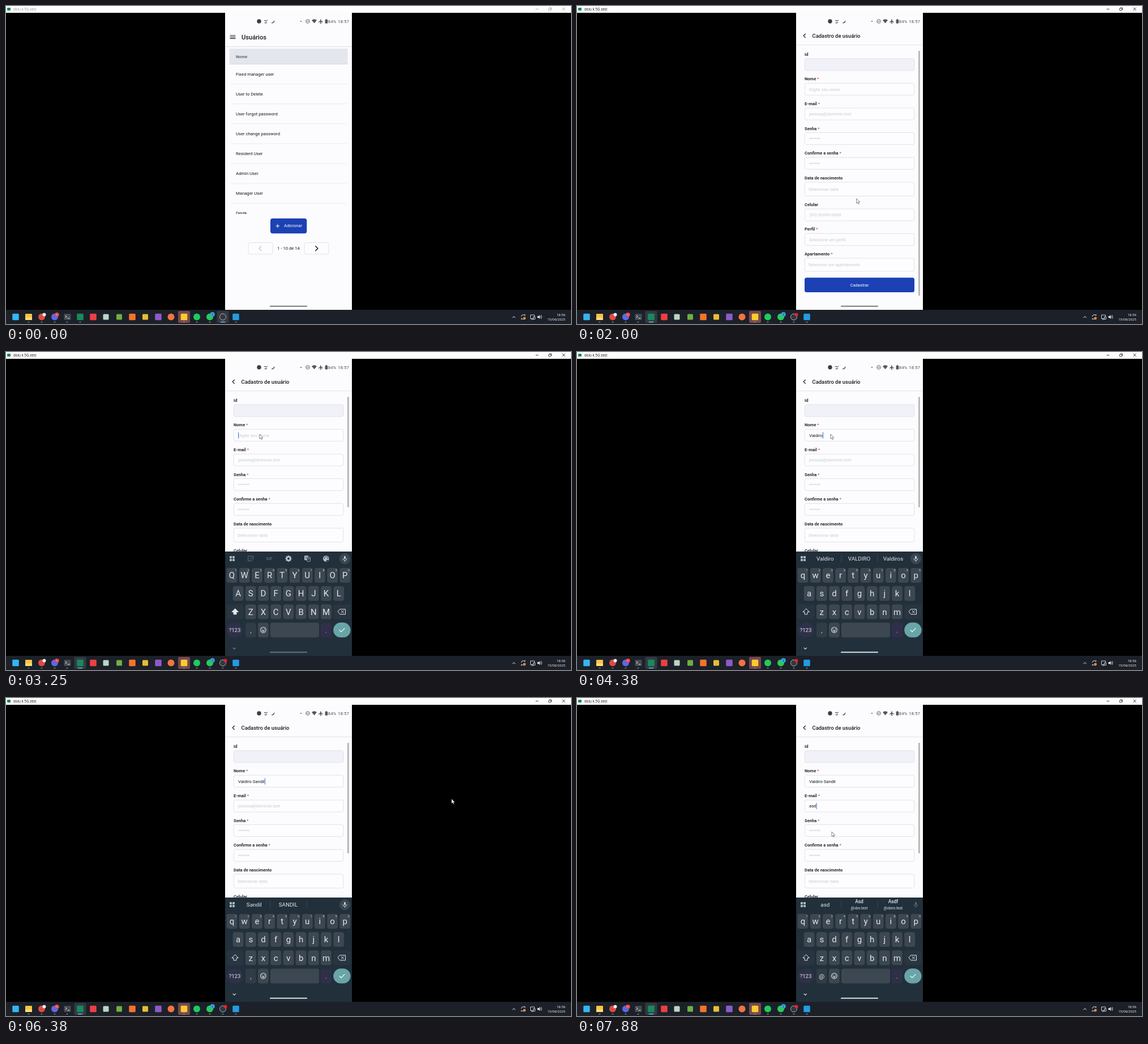
Write an HTML page that moves like this. It is 998x561 px and loops after 8 s.

```html
<!DOCTYPE html>
<html lang="pt-BR">
<head>
<meta charset="utf-8">
<title>Cadastro de usuário</title>
<style>
  html, body { margin: 0; width: 100%; height: 100%; overflow: hidden; background: #000; }
  svg { display: block; width: 100vw; height: 100vh; }
  text { font-family: Roboto, sans-serif; white-space: pre; }
  .desk text { font-family: "Open Sans", "Noto Sans", sans-serif; }
  .line { fill: none; stroke-linecap: round; stroke-linejoin: round; }
</style>
</head>
<body>
<svg id="stage" viewBox="0 0 998 561" xmlns="http://www.w3.org/2000/svg"></svg>
<script>
const LOOP = 8000, STEP = 125;
const FIRST = 'Valdiro', LAST = 'Sandil';
const INK = '#17181c', PALE = '#e3e8ec';

// Markup helpers; text is placed by the middle of its line.
const attrs = o => Object.entries(o).map(([k, v]) => ` ${k}="${v}"`).join('');
const rect = (x, y, w, h, fill, o = {}) =>
  `<rect x="${x}" y="${y}" width="${w}" height="${h}" fill="${fill}"${attrs(o)}/>`;
const circle = (x, y, r, fill, o = {}) => `<circle cx="${x}" cy="${y}" r="${r}" fill="${fill}"${attrs(o)}/>`;
const text = (x, y, size, fill, str, o = {}) =>
  `<text x="${x}" y="${y + size * 0.35}" font-size="${size}" fill="${fill}"${attrs(o)}>${str}</text>`;
const mid = (x, y, size, fill, str, o = {}) => text(x, y, size, fill, str, { 'text-anchor': 'middle', ...o });
const line = (d, stroke, width = 1, o = {}) =>
  `<path class="line" d="${d}" stroke="${stroke}" stroke-width="${width}"${attrs(o)}/>`;
const shape = (d, fill) => `<path d="${d}" fill="${fill}"/>`;
const group = (id, body, o = {}) => `<g id="${id}"${attrs(o)}>${body}</g>`;

function titleBar() {
  return rect(0, 0, 998, 12, '#fdfdfd') + rect(2, 3, 6, 5, '#178a5c', { rx: 1 }) +
    group('title', text(13, 6, 6.2, 'currentColor', 'dolu k 5G zest') +
      line('M936 5.5h4', 'currentColor', .8) +
      rect(958.5, 4, 3.8, 3.8, 'none', { stroke: 'currentColor', 'stroke-width': .8, rx: .8 }) +
      line('M960 3h3.5v3.5', 'currentColor', .7) +
      line('M982.8 3l4.6 4.6M987.4 3l-4.6 4.6', 'currentColor', .8));
}

function taskbar() {
  const square = (x, c, s = 11.5) => rect(x - s / 2, 548.5 - s / 2, s, s, c, { rx: 1.5 });
  const disc = (x, c) => circle(x, 548.5, 6, c);
  const marks = square(17, '#35b5f1') +
    rect(34, 543, 12, 11, '#f6c445', { rx: 1 }) + rect(34, 549.5, 12, 4.5, '#ffdc78', { rx: 1 }) +
    disc(63, '#dc4b3e') + circle(67.5, 544.5, 3, '#eee') +
    disc(86, '#5968ea') + circle(90, 544.5, 3.8, '#e5424a') +
    mid(90, 544.4, 4.2, '#fff', '9+') +
    rect(102.5, 543, 12, 11, '#454a50', { rx: 1 }) +
    line('M105 546l2.2 2-2.2 2M109 551h3', '#eee', 1) +
    square(131, '#178a5c') + square(154, '#ec3f42') + square(176.5, '#b9d6c4', 10) +
    square(200, '#6fae43', 10) + square(223, '#f4732b') + square(246, '#e9bd35', 10) +
    square(269, '#8b5bc8') + disc(291.5, '#f47340') +
    rect(304, 538, 21, 21, '#794750', { rx: 2 }) + square(314.5, '#f8cc2d') +
    disc(337, '#1fcb5d') + disc(360, '#29c95c') + circle(364.7, 544, 4, '#35a9e5') +
    mid(364.7, 543.8, 5.5, '#12202a', '2') +
    disc(383, '#33363c') + circle(383, 548.5, 5.5, 'none', { stroke: '#c9cbd0', 'stroke-width': .8 }) +
    group('recDot', circle(387.5, 544.5, 3, '#e8202c')) + square(406, '#249be2');
  const dots = [40, 63, 86, 108, 131, 314.5, 337, 360, 383, 406]
    .map(x => rect(x - 1.7, 557, 3.4, 1.2, '#8d9299', { rx: .6 })).join('');
  const tray = line('M894.7 550l2.4-2.4 2.4 2.4', '#eee', 1) +
    line('M910.2 547.5a3.6 3.6 0 0 1 6.5-1.3v-2M916.5 550a3.6 3.6 0 0 1-6.2 1v1.8', '#e4e6e8', 1) +
    circle(915.7, 551, 2.4, '#f08a3a') +
    line('M931 551.5h-4.5v-6.5h7v3M928 553h3', '#e4e6e8', .9) +
    rect(931.5, 548.5, 3, 4, 'none', { stroke: '#e4e6e8', 'stroke-width': .8 }) +
    shape('M938.5 547.2h2l2.2-2v6.8l-2.2-2h-2z', '#e4e6e8') +
    line('M944 546.8q1.1 1.7 0 3.4M945.5 545.5q2 3 0 6', '#e4e6e8', .8) +
    text(988, 544.6, 6, '#fff', '18:56', { 'text-anchor': 'end' }) +
    text(988, 552.4, 6, '#fff', '15/06/2025', { 'text-anchor': 'end' });
  return rect(0, 536, 998, 25, '#1c2028') +
    group('activeTab', rect(-10.5, 538, 21, 21, '#343941', { rx: 2 })) + marks + dots +
    group('activeBar', rect(-4.5, 556.8, 9, 1.5, '#63bdea', { rx: .7 })) + tray;
}

function statusBar() {
  const c = '#55565a';
  return circle(447, 27, 3.7, '#3c3d40') + line('M456.5 26q1-1.5 2 0t3-1M457 29.5q2 1 3.5-.5', '#47484c', 1.2) +
    shape('M474 25a4 4 0 0 1-6 4.7q4 0 6-4.7z', '#47484c') + circle(521, 27, 1, c) +
    circle(533, 27, 3.3, 'none', { stroke: c, 'stroke-width': .9 }) + line('M531.4 27h3.2', c, .9) +
    shape('M540 25q4.5-3.5 9 0l-4.5 5.6z', c) +
    shape('M555.3 23.5h1.2l.3 2.4 3 2v1l-3-.8-.2 1.6 1 .8v.6l-1.7-.4-1.7.4v-.6l1-.8-.2-1.6-3 .8v-1l3-2z', c) +
    rect(563.6, 24, 4.6, 6.8, c, { rx: .8 }) + rect(564.9, 23.2, 2, 1, c) +
    text(568.8, 27.3, 7.8, c, '84%') + text(586, 27.3, 8, c, '18:57');
}

function listScreen() {
  const names = ['Fixed manager user', 'User to Delete', 'User forgot password', 'User change password',
    'Resident User', 'Admin User', 'Manager User', 'Derek'];
  const rows = names.map((name, i) => {
    const y = 120 + 35.1 * i;
    return text(406, y, 7.69, INK, name) + line(`M397 ${y + 17.6}H601`, '#e2e2e6', .7);
  }).join('');
  const pager = (x, d, stroke) => rect(x, 417.5, 43, 20.3, '#fdfdff', { rx: 3, stroke: '#dcdce3', 'stroke-width': .8 }) +
    line(d, stroke, 1.5);
  return rect(387, 36, 224, 500, '#fcfcfe') +
    line('M396 52h9M396 54.7h9M396 57.4h9', INK, 1.1) +
    text(416, 55, 11.1, INK, 'Usuários', { 'font-weight': 500 }) +
    rect(387, 71.2, 224, 1, '#dcdce2') +
    rect(394.5, 75.3, 209, 27.3, '#e3e6ec') + rect(394.5, 102, 209, .8, '#cdd1dc') +
    text(406, 89.3, 7.6, '#666a70', 'Nome', { 'font-weight': 700 }) +
    group('rows', rows, { 'clip-path': 'url(#rowsClip)' }) +
    rect(467, 374.7, 64.3, 26.6, '#1b41b4', { rx: 4 }) +
    line('M476.8 388h6M479.8 385v6', '#fff', 1) + text(491, 387.8, 7.6, '#fff', 'Adicionar') +
    pager(428, 'M451 423.8l-4 4 4 4', '#c6c6cc') + pager(527, 'M546.8 423.8l4 4-4 4', INK) +
    mid(499, 427.8, 7.66, INK, '1 - 10 de 14');
}

function formScreen() {
  const fields = [ // label, required, label y, box top, box height, placeholder, placeholder x
    ['Id', 0, 85, 92.8, 21, '', 410], ['Nome', 1, 128.8, 136.3, 21, 'Digite seu nome', 410],
    ['E-mail', 1, 172.4, 180, 21, 'pessoa@dominio.test', 410], ['Senha', 1, 216, 223.4, 21, '******', 410],
    ['Confirme a senha', 1, 259.6, 267.2, 21, '******', 410],
    ['Data de nascimento', 0, 303, 310.8, 24.4, 'Selecionar data', 409],
    ['Celular', 0, 350.3, 358, 21, '(00) 00000-0000', 410],
    ['Perfil', 1, 393.8, 401.4, 21, 'Selecione um perfil', 410],
    ['Apartamento', 1, 437.3, 445, 23, 'Selecione um apartamento', 408.5]
  ].map(([label, need, y, top, h, hint, x], i) =>
    text(402, y, 7.55, '#292a30', label + (need ? ' <tspan fill="#df5a50">*</tspan>' : ''), { 'font-weight': 700 }) +
    rect(402.4, top, 193.4, h, i ? '#fdfdff' : '#f1f1fa', { rx: 3, stroke: '#dcdce1', 'stroke-width': .8 }) +
    text(x, top + h / 2 + .2, 7.66, '#cbcbcf', hint, { id: 'hint' + i })).join('');
  return rect(387, 36, 224, 500, '#fcfcfe') + line('M403.3 49.2l-3.2 3.2 3.2 3.2', INK, 1.3) +
    text(415.5, 52.6, 9.45, INK, 'Cadastro de usuário', { 'font-weight': 500 }) +
    rect(387, 68.2, 224, 1, '#e3e3ea') + fields +
    text(410, 147, 7.66, INK, '', { id: 'nameText' }) + text(410, 190.6, 7.66, INK, '', { id: 'mailText' }) +
    rect(0, -5.6, .9, 11.2, '#2c63c9', { id: 'caret' }) +
    rect(402, 479.3, 194, 25.7, '#1b41b4', { rx: 3.5 }) + mid(499, 492.2, 7.6, '#fff', 'Cadastrar') +
    rect(603, 79, 2.8, 432, '#b5b5b8', { id: 'scrollbar', rx: 1 });
}

function keyboard() {
  const KEY = '#3d4751', PITCH = 22.2;
  const key = (x, y, w = 18.8, fill = KEY) => rect(x - w / 2, y - 13, w, 26, fill, { rx: 4 });
  const letters = [['qwertyuiop', 399, 394], ['asdfghjkl', 410.1, 426], ['zxcvbnm', 432.3, 458.3]]
    .map(([row, x0, y]) => [...row].map((ch, i) => {
      const x = x0 + i * PITCH;
      return key(x, y) + mid(x, y, 15, PALE, ch, { class: 'letter' }) +
        (y === 394 ? mid(x + 6.8, 385.5, 5.6, '#c3cad0', (i + 1) % 10) : '');
    }).join('')).join('');
  const grid = [395, 400].flatMap(x => [360, 365].map(y => rect(x, y, 4, 4, '#aeb8c0', { rx: .8 }))).join('');
  const teeth = Array.from({ length: 8 }, (_, i) =>
    rect(497.8, 359, 2.4, 3, '#b9c3ca', { transform: `rotate(${i * 45} 499 364.5)` })).join('');
  const tools = line('M428 360h8.5v5.5l-3 3H428zM430.5 364l1.5 1.5 2.5-3', '#64717b', 1) +
    mid(465.3, 364.5, 7.5, '#64717b', 'GIF', { 'font-weight': 500 }) +
    teeth + circle(499, 364.5, 3.1, 'none', { stroke: '#b9c3ca', 'stroke-width': 2.4 }) +
    rect(527, 359.3, 7, 8, '#aeb8c0', { rx: 1 }) + mid(530.4, 363.2, 5.8, '#26323d', 'G') +
    rect(531.5, 362, 6, 7.5, '#26323d', { rx: 1, stroke: '#aeb8c0', 'stroke-width': .8 }) +
    line('M533 364.5h3.2M534.6 363.6v.9M533.2 367.5q2-1 2.4-3', '#aeb8c0', .6) +
    circle(565.3, 364.5, 5.3, '#b9c3ca') +
    [[562.5, 364], [564, 361.5], [567, 361.5], [568.5, 364]].map(([x, y]) => circle(x, y, .9, '#26323d')).join('') +
    circle(567.3, 368, 1.6, '#26323d');
  const words = line('M467 358.5v12M531 358.5v12', '#43505b', .8) +
    [438.3, 498.5, 558.5].map((x, i) => mid(x, 364.8, 9.8, PALE, '', { id: 'word' + i })).join('');
  const mails = mid(498.5, 359, 8.4, PALE, 'Asd', { 'font-weight': 500 }) + mid(498.5, 370.8, 6.7, PALE, '@vbn.test') +
    mid(558.5, 359, 8.4, PALE, 'Asdf', { 'font-weight': 500 }) + mid(558.5, 370.8, 6.7, PALE, '@vbnn.test');
  const mic = circle(598.5, 364.6, 9.6, '#3a4650', { id: 'micDisc' }) + group('mic',
    rect(597, 359.8, 3, 5.8, '#c8d0d6', { rx: 1.5 }) + line('M595 364.3a3.5 3.5 0 0 0 7 0M598.5 368v1.6', '#c8d0d6', 1));
  return rect(387, 352, 224, 184, '#22303b') + grid + group('tools', tools) + group('words', words) +
    group('mails', mails) + mic + letters +
    key(404.5, 458.3, 30, '#293641') +
    `<path id="shift" class="line" d="M404.5 453l-5.5 5.5h3v4.3h5v-4.3h3z" stroke="${PALE}" stroke-width="1"/>` +
    key(593.3, 458.3, 30, '#293641') +
    line('M590 453.8h9.5v9H590l-3.7-4.5zM592.3 456.2l4.2 4.2M596.5 456.2l-4.2 4.2', PALE, 1) +
    rect(389.5, 477.5, 29, 26, '#2e3149', { rx: 13 }) + mid(404, 490.6, 9.6, PALE, '?123') +
    key(432.3, 490.4, 18.8, '#303c46') + mid(432.3, 491.5, 11, PALE, ',', { id: 'comma' }) +
    key(454.4, 490.4) + circle(454.4, 490.3, 4.8, 'none', { stroke: PALE, 'stroke-width': 1.1 }) +
    circle(452.6, 489, .8, PALE) + circle(456.2, 489, .8, PALE) + shape('M451.5 491.2h5.8q-2.9 4-5.8 0z', PALE) +
    rect(467, 477.4, 86, 26, KEY, { rx: 4 }) +
    key(565.4, 490.4, 18.8, '#302f49') + mid(565.4, 491.5, 11, PALE, '.') +
    rect(578.2, 477.3, 30.4, 26.2, '#69a5a8', { rx: 13.1 }) + line('M589 490.6l3 3 6-6', '#fff', 1.2) +
    line('M401 521.8l2.3 2.3 2.3-2.3', 'currentColor', 1.1);
}

const stage = document.getElementById('stage');
stage.innerHTML = `<defs>
  <clipPath id="phoneClip"><rect x="387" y="12" width="224" height="524"/></clipPath>
  <clipPath id="bodyClip"><rect x="387" y="36" width="224" height="500"/></clipPath>
  <clipPath id="rowsClip"><rect x="387" y="75" width="224" height="292"/></clipPath></defs>` +
  rect(0, 0, 998, 561, '#000') +
  group('phone', rect(387, 12, 224, 524, '#fcfcfe') +
    `<g clip-path="url(#bodyClip)">${group('list', listScreen())}${group('form', formScreen())}</g>` +
    statusBar() + group('keys', keyboard()) + rect(466, 528.7, 66, 1.9, '#68696c', { id: 'handle', rx: .9 }),
  { 'clip-path': 'url(#phoneClip)' }) +
  `<g class="desk">${titleBar()}${taskbar()}</g>` +
  group('pointer', `<path d="M0 0v8.2l1.9-1.7 1.3 2.8 1.4-.6-1.3-2.7h2.5z" fill="#fff" stroke="#333" stroke-width=".6"/>`);

const el = Object.fromEntries([...stage.querySelectorAll('[id]')].map(n => [n.id, n]));
const letterNodes = [...stage.querySelectorAll('.letter')];
const show = (node, on) => node.setAttribute('display', on ? 'inline' : 'none');
const set = (node, name, value) => node.setAttribute(name, value);
const ease = (t, from, to) => {
  const p = Math.min(1, Math.max(0, (t - from) / (to - from)));
  return p * p * (3 - 2 * p);
};
const typed = (t, start, str) => str.slice(0, Math.max(0, Math.floor((t - start) / STEP) + 1));
const zoom = s => `translate(499 274) scale(${s}) translate(-499 -274)`;

const PATH = [[750, 985, 300], [1250, 505, 388], [1750, 505, 388], [2625, 448, 145], [5375, 448, 145],
  [5875, 800, 181], [6250, 800, 181], [6375, 787, 178], [6875, 450, 189], [7375, 450, 189], [7750, 450, 236]];

function pointerAt(t) {
  const i = PATH.findIndex(p => p[0] > t);
  if (i < 0) return PATH[PATH.length - 1].slice(1);
  const [t0, x0, y0] = PATH[Math.max(0, i - 1)], [t1, x1, y1] = PATH[i];
  const p = ease(t, t0, t1);
  return [x0 + (x1 - x0) * p, y0 + (y1 - y0) * p];
}

function drawDesktop(t) {
  const active = t >= 1375;
  set(el.title, 'color', active ? '#111' : '#999');
  const tab = `translate(${active ? 131 : 383} 0)`;
  set(el.activeTab, 'transform', tab);
  set(el.activeBar, 'transform', tab);
  show(el.recDot, t >= 500);
  show(el.pointer, t >= PATH[0][0]);
  set(el.pointer, 'transform', `translate(${pointerAt(t)})`);
}

function drawForm(t, first, last, mail, inMail) {
  const name = first + (t >= 4625 ? ' ' : '') + last;
  el.nameText.textContent = name;
  el.mailText.textContent = mail;
  show(el.hint1, !name);
  show(el.hint2, !mail);
  const lastKey = inMail ? (mail ? Math.min(t, 7500) : 6875) : t < 3625 ? 2875 : Math.min(t, 5375);
  show(el.caret, t >= 2875 && (t - lastKey) % 1000 < 500);
  const width = (inMail ? el.mailText : el.nameText).getComputedTextLength();
  set(el.caret, 'transform', `translate(${410.2 + width} ${inMail ? 190.6 : 147})`);
  set(el.scrollbar, 'height', t >= 3250 ? 195 : 432);
}

function drawKeyboard(t, first, last, mail, inMail) {
  show(el.keys, t >= 3125);
  set(el.keys, 'transform', `translate(0 ${184 * (1 - ease(t, 3050, 3240))})`);
  const ready = t >= 3500;
  set(el.keys, 'color', ready ? '#eef1f3' : '#7f8a92');
  set(el.handle, 'fill', ready ? '#f4f6f7' : t >= 3250 ? '#727c82' : '#68696c');

  const upper = !first;
  letterNodes.forEach(n => {
    n.textContent = upper ? n.textContent.toUpperCase() : n.textContent.toLowerCase();
  });
  el.shift.style.fill = upper ? PALE : 'none';
  el.comma.textContent = inMail ? '@' : ',';

  const word = inMail ? mail : last || first;
  const offers = inMail ? [word, '', ''] :
    [word, word.toUpperCase(), last ? '' : word === FIRST ? FIRST + 's' : FIRST];
  offers.forEach((offer, i) => { el['word' + i].textContent = offer; });
  show(el.tools, !word);
  show(el.words, word);
  show(el.mails, mail);
  show(el.micDisc, !inMail);
  set(el.mic, 'opacity', inMail ? .35 : 1);
}

function draw(t) {
  const swap = ease(t, 1590, 1990);
  show(el.list, swap < 1);
  set(el.list, 'transform', zoom(1 + .15 * swap));
  set(el.form, 'transform', zoom(.85 + .15 * swap));
  set(el.form, 'opacity', Math.min(1, Math.max(0, (swap - .1) / .5)));

  const inMail = t >= 6875;
  const words = [typed(t, 3625, FIRST), typed(t, 4750, LAST), typed(t, 7250, 'asd'), inMail];
  drawForm(t, ...words);
  drawKeyboard(t, ...words);
  drawDesktop(t);
}

function tick(now) {
  draw(Math.floor((now % LOOP) / STEP) * STEP);
  requestAnimationFrame(tick);
}
draw(0);
requestAnimationFrame(tick);
</script>
</body>
</html>
```
